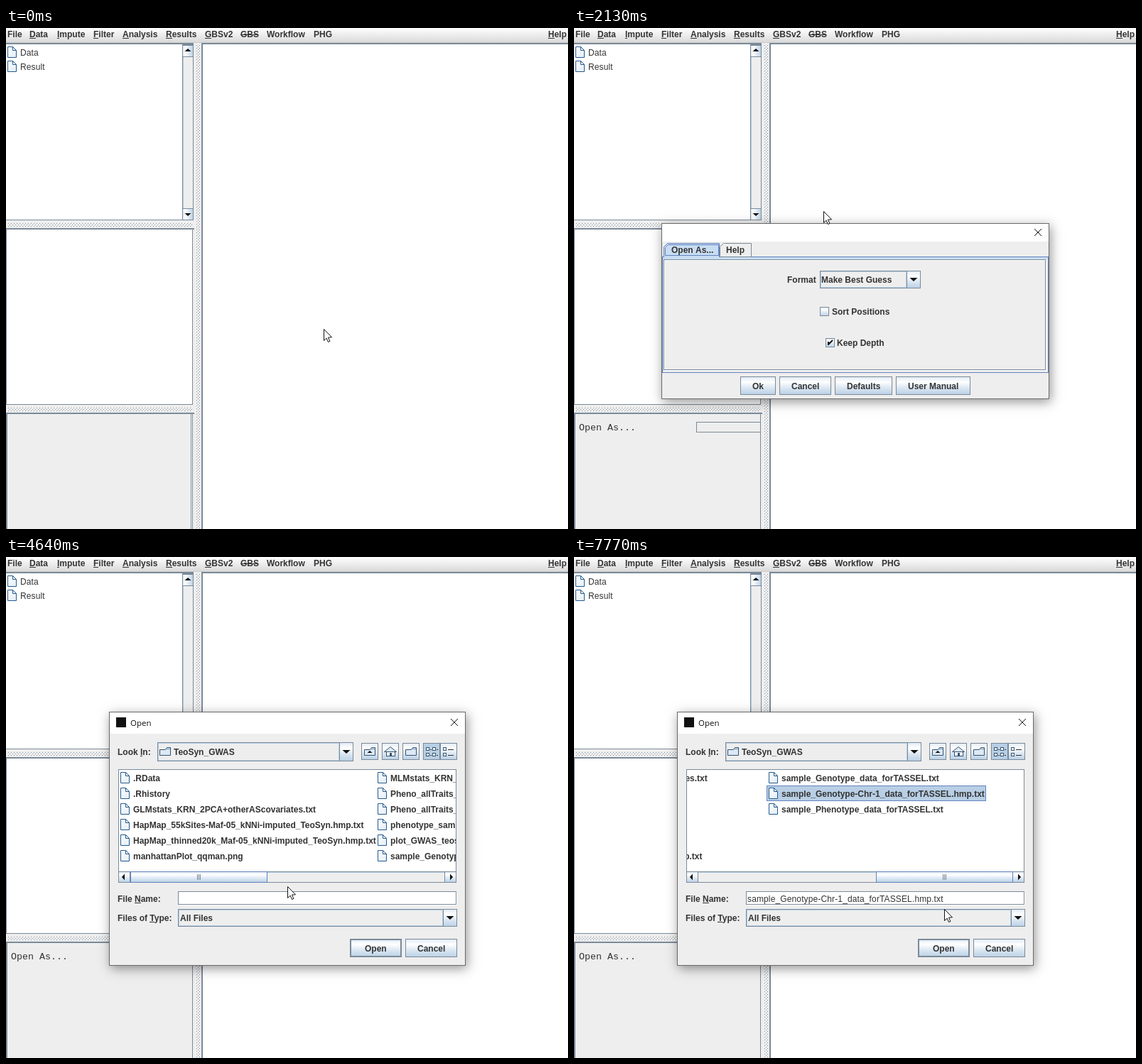
Recreate the animation shown at these times as an HTML page with a canvas. Size 791 by 706 pixels, loop 8000 ms.

```html
<!DOCTYPE html>
<html lang="en">
<head>
<meta charset="utf-8">
<title>Opening a genotype file</title>
<style>
html, body { margin: 0; width: 100%; height: 100%; overflow: hidden; background: #fff; }
canvas { display: block; }
</style>
</head>
<body>
<canvas id="stage" width="791" height="706"></canvas>
<script>
const W = 791, H = 706, LOOP = 8000;
const screen2d = document.getElementById('stage').getContext('2d');
const layer = document.createElement('canvas');
layer.width = W;
layer.height = H;
const layer2d = layer.getContext('2d');
let g = screen2d;

const BOLD = 'bold 12px "Liberation Sans", Arial, sans-serif';
const PLAIN = '12px "Liberation Sans", Arial, sans-serif';
const MONO = '13.33px "Liberation Mono", "Courier New", monospace';
const TITLE = '11.5px "Open Sans", "Noto Sans", sans-serif';
const EDGE = '#7a8a99', PANEL = '#eeeeee', INK = '#333333', FOCUS = '#6382bf', PALE = '#c8ddf2', PICK = '#b8cfe5';

// Pointer: time, x, y, click halo
const POINTER = [
  [0, 447, 424], [250, 64, 45], [570, 11, 3], [890, 11, 9], [1190, 35, 43], [1490, 38, 52],
  [1810, 183, 121], [2130, 351, 258], [2440, 350, 413], [3060, 354, 394], [3370, 297, 488],
  [3690, 262, 504, 1], [4030, 317, 493], [4330, 445, 431], [4640, 396, 464], [4940, 330, 454],
  [5260, 509, 452, 1], [5590, 547, 450, 1], [5890, 584, 448, 1], [6230, 521, 344],
  [6550, 521, 344, 1], [6870, 521, 344], [7170, 520, 334], [7460, 520, 328], [7770, 521, 496]
];
const SCROLL = [[0, 0], [5260, 431], [5590, 521], [5890, 611]];
const CARET = [[0, 1], [4640, 0], [5260, 1], [5590, 0], [6230, 1], [6550, 0]];

const MENUS = [['File', 2], ['Data', 33, 0], ['Impute', 72, 0], ['Filter', 123, 0], ['Analysis', 164, 0],
  ['Results', 225, 0], ['GBSv2', 280, 0], ['GBS', 330], ['Workflow', 367], ['PHG', 433], ['Help', 763, 0]];
const FILE_MENU = ['Open', 'Open As...', 'Save As...', 'Save Data Tree', 'Show Logging', 'Set Preferences', 'Exit'];
const COLUMNS = [
  [161, ['.RData', '.Rhistory', 'GLMstats_KRN_2PCA+otherAScovariates.txt',
    'HapMap_55kSites-Maf-05_kNNi-imputed_TeoSyn.hmp.txt',
    'HapMap_thinned20k_Maf-05_kNNi-imputed_TeoSyn.hmp.txt', 'manhattanPlot_qqman.png']],
  [523, ['MLMstats_KRN_2PCA+otherAScovariates.txt', 'Pheno_allTraits_TeoSyn.txt',
    'Pheno_allTraits_TeoSyn_forTASSEL.txt', 'phenotype_sampleFile.xlsx', 'plot_GWAS_teosyn.R',
    'sample_Genotype_data_forTASSEL.hmp.txt']],
  [885, ['sample_Genotype_data_forTASSEL.txt', 'sample_Genotype-Chr-1_data_forTASSEL.hmp.txt',
    'sample_Phenotype_data_forTASSEL.txt']]
];

const latest = (list, t) => list.filter(step => step[0] <= t).pop();

function fill(x, y, w, h, color) {
  g.fillStyle = color;
  g.fillRect(x, y, w, h);
}

function frame(x, y, w, h, color = EDGE) {
  g.strokeStyle = color;
  g.lineWidth = 1;
  g.strokeRect(x + .5, y + .5, w - 1, h - 1);
}

function etched(x, y, w, h) {
  frame(x + 1, y + 1, w, h, '#fff');
  frame(x, y, w, h);
}

function box(x, y, w, h, paint, edge = EDGE) {
  fill(x, y, w, h, paint);
  frame(x, y, w, h, edge);
}

function trace(points, close) {
  g.beginPath();
  points.forEach(([x, y], i) => i ? g.lineTo(x, y) : g.moveTo(x, y));
  if (close) g.closePath();
}

function shape(points, paint, edge) {
  trace(points, true);
  if (paint) { g.fillStyle = paint; g.fill(); }
  if (edge) { g.strokeStyle = edge; g.lineWidth = 1; g.stroke(); }
}

function text(str, x, y, font = BOLD, color = INK) {
  g.font = font;
  g.fillStyle = color;
  g.letterSpacing = font === PLAIN ? '0.13px' : '0px';
  g.fillText(str, x, y);
}

function label(str, x, y, key) {
  text(str, x, y);
  if (key === undefined) return;
  const before = g.measureText(str.slice(0, key)).width;
  fill(Math.round(x + before), y + 1, Math.round(g.measureText(str[key]).width), 1, INK);
}

function gloss(x0, y0, x1, y1) {
  const p = g.createLinearGradient(x0, y0, x1, y1);
  p.addColorStop(0, '#dde8f3');
  p.addColorStop(.3, '#ffffff');
  p.addColorStop(.6, '#dde8f3');
  p.addColorStop(1, PICK);
  return p;
}

function glossBox(x, y, w, h) {
  box(x, y, w, h, gloss(0, y, 0, y + h));
}

function arrow(x, y, dx, dy, size = 4) {
  const s = size + .5;
  shape([[x + dx * size, y + dy * size], [x + dy * s, y + dx * s], [x - dy * s, y - dx * s]], '#111');
}

function button(str, x, y, w, h, { pressed, main } = {}) {
  glossBox(x, y, w, h);
  if (pressed) fill(x + 1, y + 1, w - 2, h - 2, PICK);
  if (main) frame(x + 1, y + 1, w - 2, h - 2);
  g.font = BOLD;
  g.letterSpacing = '0px';
  text(str, Math.round(x + (w - g.measureText(str).width) / 2), y + 18);
}

function combo(str, x, y, w, h, inset, textX) {
  box(x, y, w, h, PANEL);
  frame(x + 1, y + 1, w - 21, h - 2, PICK);
  glossBox(x + w - 20, y, 20, h);
  arrow(x + w - 10, Math.round(y + h / 2) - 3, 0, 1, 5);
  text(str, textX, y + inset);
}

function page(x, y) {
  const p = g.createLinearGradient(x, y, x + 12, y + 15);
  p.addColorStop(0, '#ffffff');
  p.addColorStop(1, '#e3edf7');
  const l = x + .5, t = y + .5;
  shape([[l, t], [l + 7, t], [l + 12, t + 5], [l + 12, t + 15], [l, t + 15]], p, '#245a8d');
  trace([[l + 7, t], [l + 7, t + 5], [l + 12, t + 5]]);
  g.stroke();
}

function folder(x, y) {
  const l = x + .5, t = y + .5;
  shape([[l, t + 3], [l + 8, t + 3], [l + 10, t], [l + 15, t], [l + 15, t + 11], [l, t + 11]], '#dce8f4', '#34536f');
  fill(x + 10, y + 2, 5, 1, '#6f94b8');
}

function check(x, y, ticked) {
  glossBox(x, y, 13, 13);
  if (!ticked) return;
  fill(x + 3, y + 5, 2, 5, '#111');
  g.strokeStyle = '#111';
  g.lineWidth = 2;
  trace([[x + 4, y + 9], [x + 10, y + 3]]);
  g.stroke();
}

function cross(x, y) {
  g.strokeStyle = '#111';
  g.lineWidth = 1;
  trace([[x, y], [x + 10, y + 10]]);
  g.stroke();
  trace([[x + 10, y], [x, y + 10]]);
  g.stroke();
}

function windowFrame(x, y, w, h, bar) {
  g.save();
  g.shadowColor = 'rgba(0,0,0,.42)';
  g.shadowBlur = 15;
  g.shadowOffsetX = 2;
  g.shadowOffsetY = 4;
  fill(x, y, w, h, PANEL);
  g.restore();
  fill(x, y, w, bar, '#fff');
  frame(x, y, w, h, '#6a6a6a');
}

function makeBumps() {
  const tile = document.createElement('canvas');
  tile.width = tile.height = 4;
  const c = tile.getContext('2d');
  for (const i of [0, 1, 2, 3]) {
    c.fillStyle = i % 2 ? EDGE : '#fff';
    c.fillRect(i, i, 1, 1);
  }
  return screen2d.createPattern(tile, 'repeat');
}
const bumps = makeBumps();

// The dot pattern starts at the corner of each divider.
function grip(x, y, w, h) {
  g.save();
  g.translate(x, y);
  fill(0, 0, w, h, bumps);
  g.restore();
}

function menuBar(open) {
  const p = g.createLinearGradient(0, 0, 0, 20);
  p.addColorStop(0, '#ffffff');
  p.addColorStop(1, '#dadada');
  fill(0, 0, W, 20, p);
  fill(0, 20, W, 1, '#cccccc');
  if (open) fill(0, 0, 28, 20, '#a3b8cc');
  for (const [name, x, key] of MENUS) label(name, x, 13, key);
  fill(330, 9, 25, 1, INK);
}

function mainWindow(t) {
  fill(0, 0, W, H, PANEL);
  menuBar(t >= 890 && t < 1810);

  fill(0, 23, 248, 247, '#fff');
  box(248, 23, 16, 248, PANEL);
  fill(249, 24, 1, 246, PICK);
  box(248, 24, 16, 17, gloss(248, 0, 264, 0));
  box(248, 254, 16, 17, gloss(248, 0, 264, 0));
  fill(0, 21, 264, 2, EDGE);
  fill(0, 270, 264, 1, EDGE);
  arrow(256, 33, 0, -1);
  arrow(256, 261, 0, 1);
  ['Data', 'Result'].forEach((name, i) => {
    page(2, 26 + 20 * i);
    text(name, 20, 39 + 20 * i, PLAIN);
  });

  box(0, 282, 263, 249, '#fff');
  fill(0, 282, 265, 2, EDGE);
  fill(0, 542, 265, 2, EDGE);
  fill(0, 542, 2, 164, EDGE);
  fill(262, 544, 1, 162, EDGE);
  if (t < 1810) {
    fill(261, 544, 1, 162, '#fff');
    fill(260, 544, 1, 162, EDGE);
  } else {
    text('Open As...', 7, 567, MONO);
    frame(172, 555, 95, 15);
    fill(263, 545, 5, 161, PANEL);
  }

  grip(2, 274, 261, 6);
  grip(2, 534, 261, 6);
  grip(267, 23, 6, 683);
  fill(275, 21, 516, 685, EDGE);
  fill(277, 23, 514, 683, '#fff');
}

function fileMenu(t) {
  box(0, 20, 186, 155, PANEL);
  if (t >= 1190) fill(1, 43, 184, 20, '#a3b8cc');
  FILE_MENU.forEach((name, i) => text(name, 22, 36 + 21.5 * i));
}

function formatDialog(t) {
  const focusOnTab = t < 3060, focusOnSort = t >= 3060 && t < 3690;
  windowFrame(123, 275, 546, 248, 26);
  cross(648, 283);

  box(124, 322, 544, 164, PANEL, FOCUS);
  fill(125, 323, 542, 3, PALE);
  fill(125, 323, 1, 162, PALE);
  etched(126, 326, 538, 156);
  shape([[126.5, 322.5], [126.5, 308.5], [131.5, 303.5], [204.5, 303.5], [204.5, 322.5]], PALE, FOCUS);
  fill(127, 322, 77, 2, PALE);
  if (focusOnTab) {
    shape([[128.5, 320.5], [128.5, 309.5], [132.5, 305.5], [203.5, 305.5], [203.5, 320.5]], null, FOCUS);
  }
  shape([[205.5, 322.5], [205.5, 308.5], [210.5, 303.5], [249.5, 303.5], [249.5, 322.5]], PANEL, EDGE);
  text('Open As...', 137, 317);
  text('Help', 214, 317);

  text('Format', 300, 359);
  combo('Make Best Guess', 346, 342, 142, 25, 17, 348);
  check(346, 393, t >= 3060);
  text('Sort Positions', 363, 404);
  if (focusOnSort) frame(361, 390, 83, 19, FOCUS);
  check(354, 437, true);
  text('Keep Depth', 370, 448);

  button('Ok', 234, 491, 50, 26, { pressed: t >= 3690 });
  button('Cancel', 289, 491, 73, 26);
  button('Defaults', 367, 491, 81, 26);
  button('User Manual', 453, 491, 105, 26);
}

function toolbar() {
  for (const x of [500, 529, 558, 587, 611]) glossBox(x, 262, 24, 24);
  fill(588, 263, 22, 22, PICK);
  folder(504, 268);
  arrow(512, 276, 0, -1, 3);
  shape([[532.5, 274.5], [541, 267.5], [549.5, 274.5]], '#dce8f4', '#34536f');
  box(535, 274, 13, 7, '#fff', '#34536f');
  fill(540, 276, 3, 5, '#34536f');
  folder(562, 268);
  for (const y of [268, 276]) {
    for (const x of [591, 600]) {
      box(x, y, 5, 5, '#fff', '#34536f');
      fill(x + 6, y + 3, 2, 1, INK);
    }
    box(615, y, 5, 5, '#fff', '#34536f');
    fill(622, y + 3, 8, 1, INK);
  }
}

function fileList(scroll, picked) {
  box(158, 299, 476, 160, '#fff');
  g.save();
  g.beginPath();
  g.rect(159, 300, 474, 143);
  g.clip();
  COLUMNS.forEach(([left, names], col) => names.forEach((name, row) => {
    const x = left - scroll, y = 303 + 22 * row;
    if (picked && col === 2 && row === 1) box(x - 3, y - 3, 309, 22, PICK, FOCUS);
    page(x, y);
    text(name, x + 18, y + 13);
  }));
  g.restore();

  const thumb = Math.round(175 + scroll * .409);
  box(158, 443, 476, 16, PANEL);
  fill(159, 444, 474, 1, PICK);
  glossBox(158, 443, 17, 16);
  glossBox(617, 443, 17, 16);
  arrow(167, 451, -1, 0);
  arrow(625, 451, 1, 0);
  box(thumb, 443, 193, 16, gloss(0, 443, 0, 459), FOCUS);
  for (const i of [0, 2, 4]) fill(thumb + 94 + i, 447, 1, 8, EDGE);
}

function openDialog(t) {
  const picked = t >= 7460;
  windowFrame(145, 218, 502, 358, 31);
  fill(155, 226, 14, 14, '#111');
  text('Open', 175, 238, TITLE, '#111');
  cross(626, 228);

  label('Look In:', 157, 279, 5);
  combo('TeoSyn_GWAS', 213, 261, 276, 27, 18, 236);
  folder(216, 268);
  toolbar();
  fileList(latest(SCROLL, t)[1], picked);

  label('File Name:', 157, 486, 5);
  fill(242, 471, 392, 19, '#fff');
  etched(242, 471, 392, 19);
  if (picked) text(COLUMNS[2][1][1], 244, 486, PLAIN);
  else if (latest(CARET, t)[1]) fill(244, 473, 1, 16, '#111');
  label('Files of Type:', 157, 513, 9);
  combo('All Files', 242, 496, 393, 25, 17, 245);
  button('Open', 484, 538, 73, 26, { main: true });
  button('Cancel', 562, 538, 73, 26);
}

// The window fades and grows in as one picture.
function fadingDialog(t) {
  g = layer2d;
  g.clearRect(0, 0, W, H);
  openDialog(t);
  g = screen2d;
  g.save();
  g.globalAlpha = .7;
  g.translate(395.5, 396.5);
  g.scale(.982, .982);
  g.drawImage(layer, -396, -397);
  g.restore();
}

function pointer([, x, y, halo]) {
  if (halo) {
    g.fillStyle = 'rgba(248,242,20,.68)';
    g.beginPath();
    g.arc(x, y, 12, 0, 2 * Math.PI);
    g.fill();
  }
  g.save();
  g.translate(x + .5, y + .5);
  shape([[0, 0], [0, 16], [3.6, 12.6], [6, 18], [8.4, 17], [6, 11.6], [11, 11.3]], '#fff', '#111');
  g.restore();
}

function draw(now) {
  const t = now % LOOP;
  mainWindow(t);
  if (t >= 890 && t < 1810) fileMenu(t);
  if (t >= 2130 && t < 4030) formatDialog(t);
  if (t >= 4030 && t < 4330) fadingDialog(t);
  if (t >= 4330) openDialog(t);
  pointer(latest(POINTER, t));
  requestAnimationFrame(draw);
}
draw(0);
</script>
</body>
</html>
```
